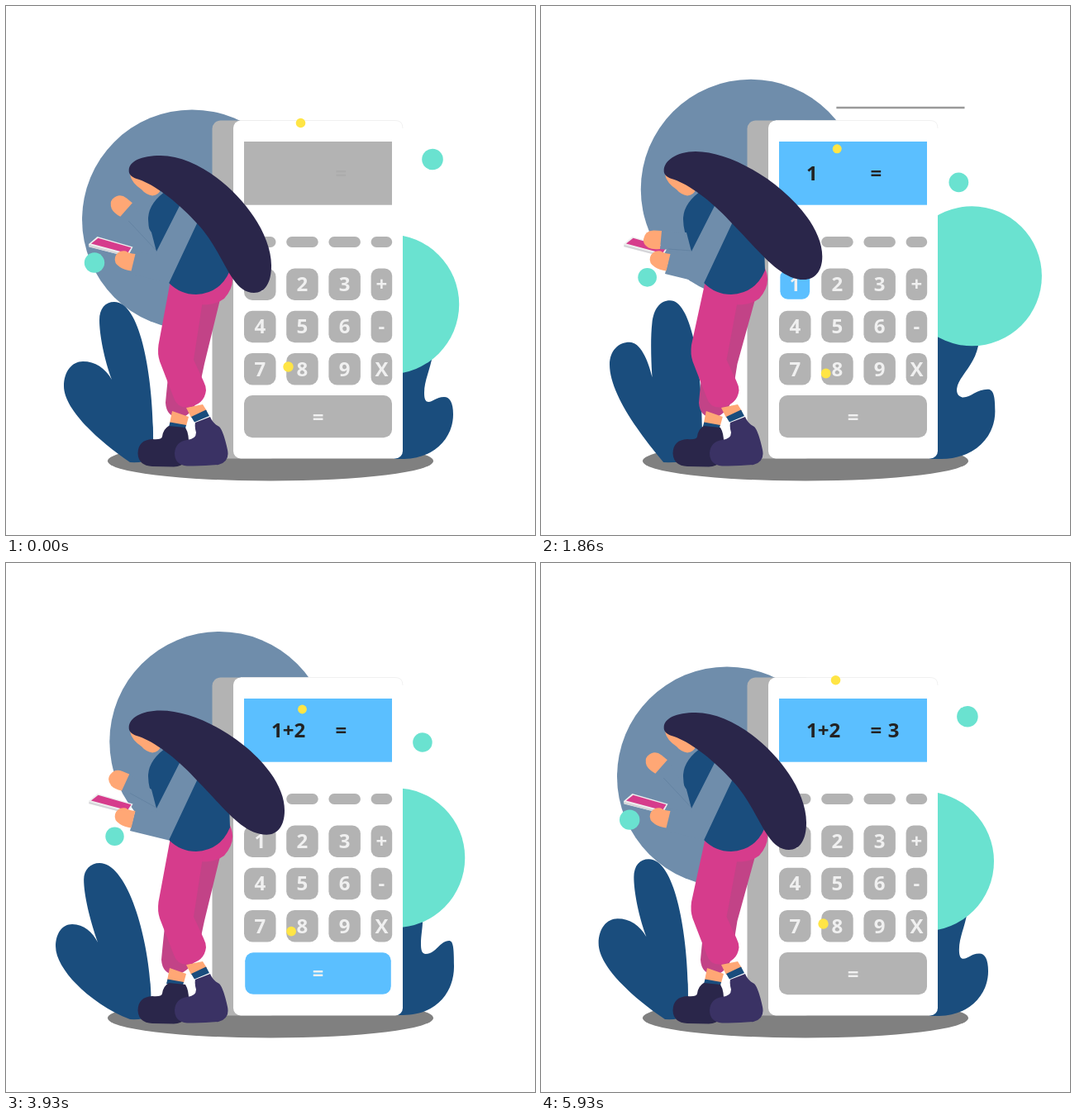
Write an HTML page that moves like this. It is 640 by 640 pixels and loops after 6 s.

```html
<!DOCTYPE html>
<html lang="en">
<head>
<meta charset="utf-8">
<title>Calculator</title>
<style>
  html, body { margin: 0; width: 100%; height: 100%; overflow: hidden; background: #fff; }
  svg { display: block; width: 100vw; height: 100vh; }
  text { font: 700 24px "Noto Sans", "Open Sans", sans-serif; }
  .key { transform-box: fill-box; transform-origin: center; }
  .key rect { fill: #b3b3b3; }
  .key text { fill: #f0f0f0; text-anchor: middle; }
  .key.on rect { fill: #5bbfff; }
  #display text { fill: #222; }
  .slate { fill: #6f8dab; }
  .navy { fill: #1a4d7d; }
  .ink { fill: #2a264a; }
  .pink { fill: #d63c8c; }
  .skin { fill: #ffa775; }
  .teal { fill: #6ae2d0; }
  .sun { fill: #ffe545; }
  .dash { stroke: #999; stroke-width: 2.4; }
</style>
</head>
<body>
<svg viewBox="0 0 640 640">
  <ellipse cx="320" cy="550.5" rx="197" ry="24" fill="#808080"/>
  <circle id="disc" class="slate" r="133"/>
  <path id="leafL" class="navy"/>
  <path id="leafR" class="navy"/>
  <circle id="ball" class="teal" r="84.5"/>
  <line id="dash1" class="dash" y1="123" y2="123"/>
  <line id="dash2" class="dash" y1="301.7" y2="301.7"/>

  <rect x="249.5" y="138.5" width="80" height="409" rx="10" fill="#b3b3b3"/>
  <rect x="275" y="138.5" width="205" height="409" rx="9" fill="#fff"/>
  <path d="M284 138.5H471Q480 138.5 480 148" fill="none" stroke="#eee" stroke-width=".8"/>
  <rect id="screen" x="288" y="164" width="179" height="76.7"/>
  <g id="display">
    <text id="sum" x="321" y="210.5"></text>
    <text id="equals" x="398.6" y="210.5">=</text>
    <text id="result" x="419.7" y="210.5">3</text>
  </g>
  <g id="keys"></g>

  <!-- legs and shoes -->
  <path id="backLeg" fill="#c24387"/>
  <g id="backAnkle">
    <path class="skin" d="M201 490L221 497L218 508L198 505Z"/>
    <path class="navy" d="M198.5 503.5L218 507L217 511L197 509Z"/>
  </g>
  <path class="ink" d="M197 508L217 510Q222 518 221 534Q222 557 203 557.5L177 557Q160 556 159.500 541Q160 525 177 524Q188 525 189 521Q190 512 197 508Z"/>
  <path class="skin" d="M218 486L238 482L243 490L224 498Z"/>
  <path class="navy" d="M224 497L242 488.500L246 496L228 503.500Z"/>
  <path fill="#3a3264" d="M229 504L247 497Q250 505 258 509Q263 514 268 537Q271 551 257 555Q238 557 219 556.500Q204 555 204 541Q205 527 219 525Q230 524 230 516Q228 509 229 504Z"/>
  <path class="pink" d="M268 312Q282 334 264 354Q252 363 231 361L225 345Z"/>
  <path id="frontLeg" class="pink"/>

  <!-- upper body -->
  <path class="navy" d="M196 222Q172 238 172 258Q172 274 182 297L197 335Q211 349 230 349Q259 348 271 320L270 290L235 225Z"/>
  <path fill="#eee" d="M100 288L110.500 279L153.500 291.500L148.500 301L146 303L100.500 291.500Z"/>
  <path d="M100.500 290L146 302" stroke="#d4d4d8" stroke-width="2"/>
  <path class="pink" d="M103 287.500L111.500 280.800L151.500 292.300L147 299.300Z"/>
  <path id="farArm" class="slate"/>
  <line id="seam" x2="182" y2="296" stroke="#587898" stroke-width=".5"/>
  <path id="hand" class="skin" d="M11 -11L9 11Q0 12 -5 9.500Q-12 5 -11 -1Q-9 -12 2 -11.500Z"/>
  <path class="slate" d="M214 234L240 244L197 335.500L150 324L157 297L181 301L182 297Z"/>
  <path class="skin" d="M156.500 300L151.500 320.500Q143 319 138 316Q130 311 132 304Q135 295 145 296.500Q148 299 156.500 300Z"/>
  <path class="skin" d="M150 204L178 212L187 222Q185 229 177 229.500Q169 228 164 222Q152 214 150 204Z"/>
  <path id="hair" class="ink"/>

  <circle id="tealA" class="teal"/>
  <circle id="tealB" class="teal"/>
  <circle id="sunA" class="sun"/>
  <circle id="sunB" class="sun"/>
</svg>
<script>
const LOOP = 6000;
const $ = id => document.getElementById(id);
const set = (id, attrs) => { for (const k in attrs) $(id).setAttribute(k, attrs[k]); };
const lerp = (a, b, u) => a + (b - a) * u;
const clamp = u => Math.min(1, Math.max(0, u));
const span = (t, a, b) => clamp((t - a) / (b - a));
const smooth = u => u * u * (3 - 2 * u);

function bezier(x1, y1, x2, y2) {
  const f = (a, b, s) => 3 * (1 - s) ** 2 * s * a + 3 * (1 - s) * s * s * b + s ** 3;
  return u => {
    let lo = 0, hi = 1;
    for (let i = 0; i < 24; i++) {
      const s = (lo + hi) / 2;
      if (f(x1, x2, s) < u) lo = s; else hi = s;
    }
    return f(y1, y2, lo);
  };
}
const glide = bezier(.08, .58, .36, 1);

// Smooth curve through rows of [time, ...values] without overshoot
function track(rows) {
  const secant = (i, c) => (rows[i + 1][c] - rows[i][c]) / (rows[i + 1][0] - rows[i][0]);
  const last = rows.length - 1;
  const slope = (i, c) => {
    if (i === 0) return secant(0, c);
    if (i === last) return secant(last - 1, c);
    const a = secant(i - 1, c), b = secant(i, c);
    return a * b > 0 ? 2 * a * b / (a + b) : 0;
  };
  return t => {
    let i = 0;
    while (i < last - 1 && t > rows[i + 1][0]) i++;
    const h = rows[i + 1][0] - rows[i][0], u = clamp((t - rows[i][0]) / h);
    return rows[i].slice(1).map((a, k) => {
      const c = k + 1, s = smooth(u);
      return lerp(a, rows[i + 1][c], s)
        + h * u * (1 - u) * ((1 - u) * slope(i, c) - u * slope(i + 1, c));
    });
  };
}

// Blend two paths of the same structure
const NUM = /-?[\d.]+/g;
function mix(a, b, u) {
  const to = b.match(NUM);
  let i = 0;
  return a.replace(NUM, n => lerp(+n, +to[i++], u).toFixed(2));
}

const leftLeaf = [
  'M150 552C110 525 70 487 70 460C70 442 80 430 93 430C108 430 120 438 128 452C119 428 113 398 113 380C113 366 120 358 131 358C165 358 179 460 178 530L177 548Q165 553 150 552Z',
  'M148 552C118 515 84 466 84 432C84 415 95 405 108 405C121 405 130 427 135 449C134 425 134 400 136 384C138 366 146 356 158 356C184 356 198 440 196 530L195 548Q165 553 148 552Z',
  'M150 552C104 535 60 492 60 464C60 448 68 437 80 437C94 437 105 447 111 459C101 431 94 401 94 383C94 371 102 363 113 363C148 363 175 460 175.5 530L175 548Q165 553 150 552Z'
];
const rightLeaf = [
  'M470 548L482 548C515 548 541 525 541 494C541 480 537 473 530 473C520 473 517 479 511 479C507 479 506 474 506 468C506 455 511 445 515 428L518 400L470 400Z',
  'M470 548L480 548C520 550 550 525 550 490C550 470 548 463 541 463C528 463 520 473 511 473C505 473 502 468 503 462C505 448 525 435 530 410L532 380L470 380Z',
  'M470 547L480 547C520 547 542 520 542 488C542 465 541 457 536 457C525 457 520 473 508 473C503 473 502 468 502 461C502 450 504 442 504 432L505 400L470 400Z'
];
function leaf(poses, t) {
  const [a, b, c] = poses;
  if (t < 2000) return mix(a, b, t / 2000);
  if (t < 4000) return mix(b, c, smooth((t - 2000) / 2000));
  return mix(c, a, (t - 4000) / 2000);
}

// time, top, right x, right y, bottom x, bottom y
const hairPose = track([
  [0, 181, 321, 314, 300, 347],
  [860, 184, 340, 308, 319, 334],
  [1860, 176, 340.3, 303, 318, 331],
  [2640, 174, 340, 300, 318, 327],
  [3360, 175, 337.5, 297, 317, 327],
  [4430, 181, 336.5, 303, 313, 331.5],
  [5930, 181, 321, 314, 300, 347],
  [6000, 181, 321, 314, 300, 347]
]);
// time, x, y, turn
const handPose = track([
  [0, 137.5, 240.6, 36],
  [860, 133, 264, 15],
  [1700, 135, 283, 0],
  [2750, 135, 283, 0],
  [3360, 140, 279, 5],
  [4430, 131.3, 248.5, 30],
  [5930, 137.5, 240.6, 36],
  [6000, 137.5, 240.6, 36]
]);
// time, front leg shift, back leg shift
const legPose = track([
  [0, 0, 0], [860, -1.5, 0], [1860, -2.5, -2], [2640, 0, -5],
  [4430, 0, -5], [5930, -2.5, 0], [6000, -2.5, 0]
]);
const power = track([[0, 0, .04], [860, .25, .4], [1600, 1, 1], [6000, 1, 1]]);

// id, start x, y, radius, shift x, y, radius
const dots = [
  ['sunA', 356.5, 141.5, 5.8, 2.6, 47, -.5],
  ['sunB', 341.5, 436.5, 6.2, 4.8, 12, -.4],
  ['tealA', 107, 310.5, 12.2, 32.5, 26.8, -1.3],
  ['tealB', 516, 185.5, 12.8, -16, 41.8, -1.4]
];

// label, press start, press end, typed text
const presses = [
  ['1', 1600, 2150, '1'],
  ['+', 2400, 2900, '+'],
  ['2', 3270, 3770, '2'],
  ['=', 3900, 4400, '']
];

const keys = {};
function addKey(label, x, y, w, h, r) {
  const base = y + h / 2 + (h > 45 ? 9 : 8.5);
  $('keys').insertAdjacentHTML('beforeend',
    `<g class="key"><rect x="${x}" y="${y}" width="${w}" height="${h}" rx="${r}"/>` +
    `<text x="${x + w / 2}" y="${base}">${label}</text></g>`);
  keys[label] = $('keys').lastElementChild;
}
const cols = [288, 339.2, 390.4, 441.6];
cols.forEach((x, c) => {
  const w = c < 3 ? 38.5 : 25.6;
  addKey('', x, 279, w, 13, 6.5);
  ['123+', '456-', '789X'].forEach((row, r) => addKey(row[c], x, 317.5 + r * 51.2, w, 38.5, c < 3 ? 10 : 9));
});
addKey('=', 288, 471, 179, 51.2, 10);

function dash(id, t, start, end) {
  const head = lerp(512.5, 332, span(t, start, start + 420));
  const tail = lerp(512.5, 332, smooth(span(t, start + 360, end)));
  set(id, { x1: head, x2: tail, visibility: tail - head > .5 ? 'visible' : 'hidden' });
}

function drawBody(t) {
  const [top, rx, ry, bx, by] = hairPose(t);
  set('hair', { d: `M148.7 200C148 188 163 ${top} 187 ${top}C247 ${top} ${rx} ${ry - 56} ${rx} ${ry}` +
    `C${rx} ${lerp(ry, by, .65)} ${bx + 13} ${by} ${bx} ${by}` +
    `C${bx - 29} ${by} ${lerp(262, bx, .05)} 297 231 263C205 234 176 214 158 209C152 207 149 204 148.7 200Z` });

  const [x, y, turn] = handPose(t);
  const a = turn * Math.PI / 180, cos = Math.cos(a), sin = Math.sin(a);
  const local = (px, py) => [x + px * cos - py * sin, y + px * sin + py * cos];
  const up = local(11, -11), low = local(9, 11);
  set('hand', { transform: `translate(${x} ${y}) rotate(${turn})` });
  set('farArm', { d: `M${up}L176 274L182 297L${low}Z` });
  set('seam', { x1: low[0] + 10, y1: low[1] + 9 * sin });

  const [k, b] = legPose(t);
  set('frontLeg', { d: `M199 332L${184.5 + k} 410Q${183 + k} 421 ${186 + k} 430L${203 + k} 474` +
    `Q${207 + k} 486 ${219 + k} 485.5Q${240 + k} 483 ${242 + k} 465Q${242 + k} 460 ${239 + k} 454` +
    `L${227 + k} 428L238 356L240 345Z` });
  set('backLeg', { d: `M231 350L259 355L${240 + k} 433L230 480Q${222 + b} 497 ${210 + b} 498.500` +
    `Q${194 + b} 497 ${193 + b} 480Q${194 + b} 468 ${197 + b} 440Z` });
  set('backAnkle', { transform: `translate(${b * .6} 0)` });
}

function drawCalculator(t) {
  const [lit, ink] = power(t);
  const rgb = [[179, 91], [179, 191], [179, 255]].map(([p, q]) => Math.round(lerp(p, q, lit)));
  set('screen', { fill: `rgb(${rgb})` });
  set('equals', { opacity: ink });
  set('result', { visibility: t >= 4000 ? 'visible' : 'hidden' });
  let typed = '';
  for (const [label, start, end, text] of presses) {
    const down = t >= start && t < end;
    const size = 1 - .07 * Math.sin(Math.PI * span(t, start, end));
    keys[label].classList.toggle('on', down);
    keys[label].style.transform = `scale(${size})`;
    if (t >= start) typed += text;
  }
  $('sum').textContent = typed;
}

function draw(t) {
  const d = t < 4000 ? glide(t / 4000) : 1 - glide((t - 4000) / 2000);
  set('disc', { cx: 225 + 33.3 * d, cy: 258.5 - 42.5 * d });
  const b = t < 2000 ? glide(t / 2000) : 1 - glide((t - 2000) / 4000);
  set('ball', { cx: 463.5 + 58 * b, cy: 361 - 34.3 * b });
  set('leafL', { d: leaf(leftLeaf, t) });
  set('leafR', { d: leaf(rightLeaf, t) });
  dash('dash1', t, 1500, 2660);
  dash('dash2', t, 3280, 4300);

  const half = 1 - Math.abs(t - 3000) / 3000;
  const drift = lerp(smooth(half), half, .2);
  for (const [id, x, y, r, dx, dy, dr] of dots)
    set(id, { cx: x + dx * drift, cy: y + dy * drift, r: r + dr * drift });

  drawBody(t);
  drawCalculator(t);
}

const begin = performance.now();
function tick() {
  draw((performance.now() - begin) % LOOP);
  requestAnimationFrame(tick);
}
tick();
</script>
</body>
</html>
```
